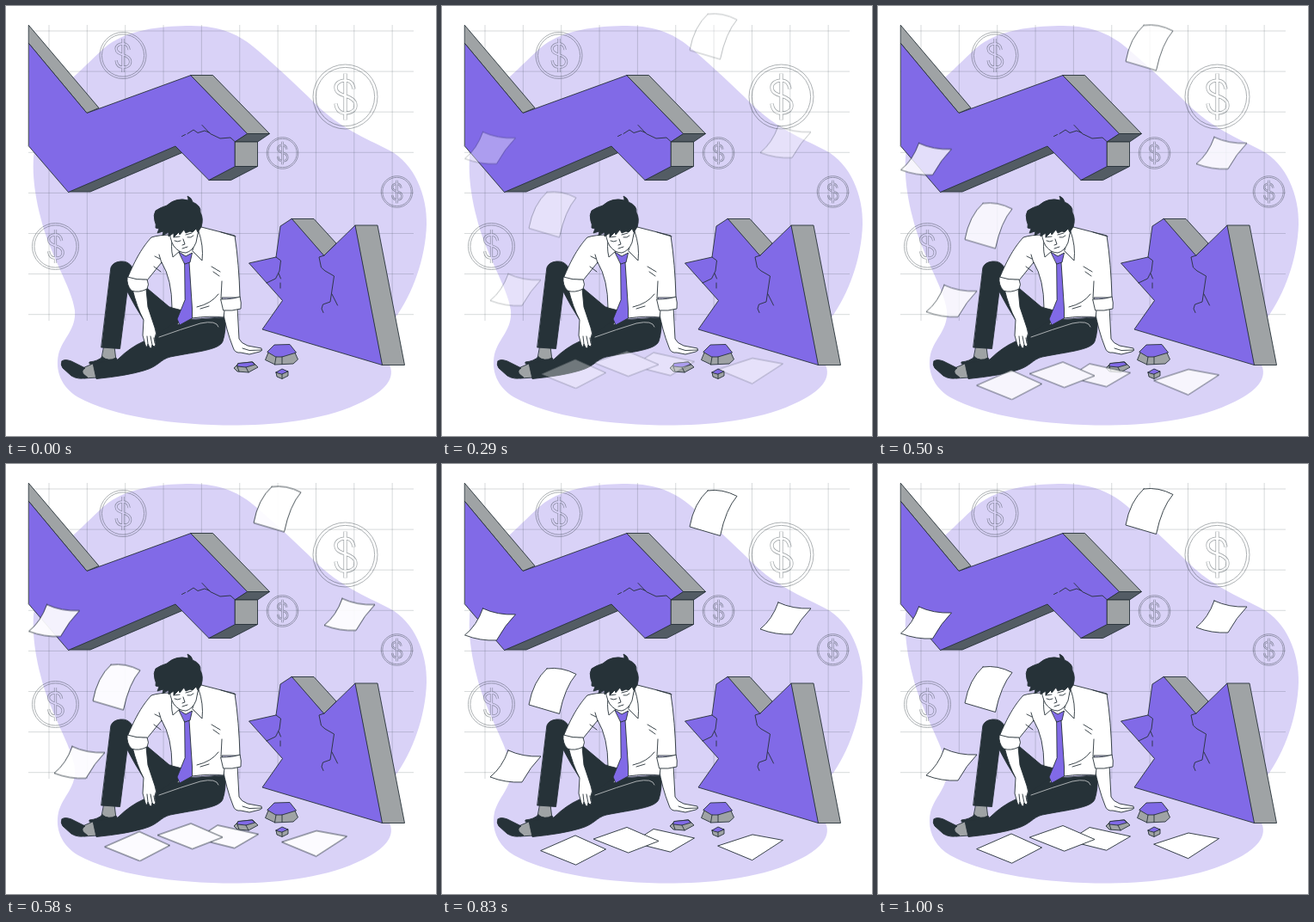
An HTML page for the animation above (1.04 s loop, 500x500 px).

```html
<!DOCTYPE html>
<html lang="en">
<head>
<meta charset="utf-8">
<title>Falling market</title>
<style>
  html, body { margin: 0; width: 100%; height: 100%; overflow: hidden; background: #fff; }
  svg { display: block; width: 100vw; height: 100vh; }
  .art { stroke: #263238; stroke-width: .9; stroke-linejoin: round; stroke-linecap: round; }
  .main { fill: #816ae7; }
  .gray { fill: #9fa3a5; }
  .deep { fill: #535c64; }
  .dark { fill: #263238; }
  .white { fill: #fff; }
  .line { fill: none; }
</style>
</head>
<body>
<svg viewBox="0 0 500 500">
  <path fill="#d9d2f7" d="M210 23C248 22 272 33 292 51C314 70 338 92 359 113C388 142 417 153 446 168C475 183 490 221 489 254C488 294 472 336 453 362C437 384 441 405 447 420C451 433 442 447 415 460C375 480 322 487 270 487.500C200 488 125 478 84 455C64 443 57 424 61 405C66 386 82 376 80 354C77 328 50 288 40 245C31 209 28 176 38 143C47 114 62 98 78 83C92 71 105 56 119 45C145 27 178 24 210 23Z"/>
  <path id="grid" fill="none" stroke="#263238" stroke-opacity=".18"/>
  <g id="coins"></g>

  <g class="art">
    <path class="gray" d="M26.500 22.500 108 118.500 94 124.500 26.500 43.500Z"/>
    <path class="deep" d="M72.500 216H98L205 170.500 197 163Z"/>
    <path class="deep" d="M236 202.500H261.500L292.500 186.500H266Z"/>
    <path class="main" d="M26.500 43.500 94 124.500 215 80.500 281 148.500 266.500 158V186.500L236 202.500 197 163 72.500 216.500 26.500 163Z"/>
    <path class="gray" d="M215 80.500H240.500L306.500 148.500H281Z"/>
    <path class="deep" d="M281 148.500H306.500L292.500 158H266.500Z"/>
    <path class="gray" d="M266.500 158H292.500V186.500H266.500Z"/>
    <path class="line" d="M228 138.500 237.500 148.500 249 154 261 153 266.500 158M237 147.500 231 145 223 147.500 218 144 211 148.500M208.500 149.500 204.500 151.500"/>
  </g>

  <g class="art">
    <path class="gray" d="M332 247.500H358L384 276 370 290Z"/>
    <path class="gray" d="M406 255H432L463.500 417.500H437.500Z"/>
    <path class="main" d="M332 247.500 319 256 314 292 282.500 299 321.500 342.500 298 376 437.500 417.500 406 255 370 290Z"/>
    <path class="line" d="M314 292 319.500 296 318 308 313.500 317 303 322M317 311 319.500 317M319 322V328M370 290 364 292 366.500 304 371 308 381.500 314 377 344 368.500 347 367 352 369 356.500M379 335 385.500 348"/>
  </g>

  <g class="art">
    <!-- raised leg -->
    <path class="gray" d="M114 396H126L128 412H111Z"/>
    <path class="dark" d="M112 408Q119 414 128 409L130 414 101 417Q96 417 97 414Q107 413 112 408Z"/>
    <path class="dark" d="M122 304Q124 298 133 297Q142 296 147 304L165 329 190 350 215 354 212 378 176 386Q159 367 141 332L132.500 398.500 111 397Z"/>
    <!-- stretched leg -->
    <path class="gray" d="M87 422 103 415 106 432 91 433Z"/>
    <path class="dark" d="M65 413Q68 410 76 413L92 421Q87 424 90 428L95 432Q84 435 76 430L66 421Q63 417 65 413Z"/>
    <path class="dark" d="M255 362Q256 378 252 390C248 400 221 402 191 408C179 411 178 419 160 424Q140 430 105 433.500L101 415Q116 414 130 411Q144 397 160 390Q180 381 198 366Z"/>
    <path fill="none" stroke="#b9bdbf" d="M178 385Q203 376 226 369Q245 365 247 373"/>

    <!-- supporting arm -->
    <path class="white" d="M252 353Q256 377 264 397Q266 404 273 403L283 405 295 402Q299 401 297 398L281 395Q273 392 271 387L269 350Z"/>
    <path class="line" d="M275 398 283 400.500 297 400"/>
    <!-- shirt -->
    <path class="white" d="M193 266Q178 266 169 269C159 280 151 293 141 317L164 319 181 298Q193 318 193 351L205 354Q203 364 199 371L216 363Q238 360 253 362L254 354 251 339 272 339Q271 300 266 267L227 257Z"/>
    <path class="white" d="M250 341Q264 341 272 338Q274 345 273 352Q263 355 253 354Z"/>
    <path class="line" d="M178 289 181 299M173 291 179 294M172 303 180 309M239 303 249 309M241 309 248 314M251 320 250 340M222 350Q239 346 247 335M226 352 236 349M250 263 267 268"/>
    <!-- hanging arm -->
    <path class="white" d="M147 329Q152 350 160 365L159 383 162 394Q164 399 165 393L167 397Q169 400 170 394L172 396Q175 396 173 386Q176 381 173 374L165 350 163 329Z"/>
    <path class="line" d="M164 384 165 393M168 384 170 394M172 386 173 392"/>
    <path class="white" d="M141 315Q152 319 164 318Q167 324 164 329Q154 334 146 331Q140 325 141 315Z"/>
    <!-- tie and collar -->
    <path class="main" d="M208 298H213L216.500 352V363L202 371 199 364 208 342Z"/>
    <path class="main" d="M201 286 209 291 216.500 287 214 298 208 300Z"/>
    <path class="white" d="M194 267Q191 280 194 292L202 285ZM224 262Q230 279 228 296L217 285Z"/>
    <!-- head -->
    <path class="white" d="M190 257Q190 271 195 279Q201 287 209 287Q217 285 221 275L225 255Z"/>
    <path class="line" d="M196 273Q200 275 203 273M211 269Q215 270 218 267M195 269 202 268M209 266 216 264M206 271 208 277 205 278M205 282 211 280"/>
    <path class="dark" d="M212 226Q212 223 211 221Q216 223 217 228Q227 232 226 240Q230 247 227 257L223 263 221 259 217 263 214 262 209 264 207 260 202 266 201 263 195 269 195 264 189 268 189 263 182 267 183 262 176 264 178 259 174 258Q175 254 173 250Q171 243 174 238Q180 234 187 232Q198 222 212 226Z"/>
  </g>

  <g class="art">
    <path class="gray" d="M305 403 301.500 411.500 313 417 334 416 339.500 411 335 401Z"/>
    <path class="main" d="M304 402 312 394 330 393.500 337.500 403 321 408 314 408Z"/>
    <path class="line" d="M314 408 312.500 417M321 408V416.500"/>
    <path class="gray" d="M270 416 265 421 269 425 282 426 293 420 287 414Z"/>
    <path class="main" d="M270 415.500 286 414 289.500 417 279 420 269 419Z"/>
    <path class="line" d="M279 420 282 426M269 419 271 425"/>
    <path class="gray" d="M314 426 315 431 321 433.500 328 430V425Z"/>
    <path class="main" d="M314 426 321 422 328 425 321 428Z"/>
    <path class="line" d="M321 428V433"/>
  </g>

  <defs>
    <path id="wide" d="M21 0Q38 8 59 7Q47 19 37 37Q18 38 0 31Q14 20 21 0Z"/>
    <path id="tall" d="M21 0.500Q38-2 55 7Q42 22 35.500 53L0 42.500Q5 15 21 .5Z"/>
  </defs>
  <g id="papers" class="art white" opacity="0">
    <use href="#tall" x="288" y="28.500"/>
    <use href="#tall" x="101" y="235.500"/>
    <use href="#wide" x="26.500" y="166"/>
    <use href="#wide" x="56" y="331"/>
    <use href="#wide" x="370" y="159"/>
    <path d="M222 438 246 422.500 293.500 433 266 449Z"/>
    <path d="M176.500 434 215 420.500 252 436.500 217 450Z"/>
    <path d="M115 447.500 155 430 190.500 446 156 464Z"/>
    <path d="M321 442 361 429 396.500 435.500 361 458.500Z"/>
  </g>
</svg>
<script>
  const $ = id => document.getElementById(id);

  const rows = Array.from({ length: 8 }, (_, i) => `M26 ${29 + 47.1 * i}H474`);
  const cols = Array.from({ length: 10 }, (_, i) => `M${50 + 44.35 * i} 22V366`);
  $('grid').setAttribute('d', rows.concat(cols).join(''));

  // The dollar sign is hollow: a wide stroke with a narrower one masked out.
  const bar = 'M0-27V27';
  const curve = 'M10-9C9-16 5-19 0-19C-7-19-11-15-11-11C-11-5-6-3 0-1C7 1 12 4 12 10C12 16 7 19 0 19C-6 19-10 16-11 8';
  function coin([x, y, r], i) {
    const k = r / 37.5;
    const stroke = (color, w) =>
      `<path d="${bar}${curve}" fill="none" stroke="${color}" stroke-width="${w}"/>`;
    return `<g transform="translate(${x} ${y})" opacity=".42">
      <g fill="none" stroke="#263238" stroke-width=".9"><circle r="${r}"/><circle r="${r * .91}"/></g>
      <mask id="coin${i}" maskUnits="userSpaceOnUse" x="-40" y="-40" width="80" height="80">
        <g transform="scale(${k})">${stroke('#fff', 3.4 + .8 / k)}${stroke('#000', 3.4 - .7 / k)}</g>
      </mask>
      <rect x="-40" y="-40" width="80" height="80" fill="#263238" mask="url(#coin${i})"/></g>`;
  }
  $('coins').innerHTML = [
    [136, 57.5, 27], [394.5, 105.5, 37.5], [321.5, 171, 18.3], [454.5, 216, 18.3], [57.5, 279.5, 27]
  ].map(coin).join('');

  // Cubic Bezier easing that overshoots before it settles.
  const cubic = (s, a, b) => 3 * (1 - s) ** 2 * s * a + 3 * (1 - s) * s * s * b + s ** 3;
  function ease(t) {
    let lo = 0, hi = 1;
    for (let i = 0; i < 30; i++) {
      const mid = (lo + hi) / 2;
      if (cubic(mid, .36, .5) < t) lo = mid; else hi = mid;
    }
    return cubic(lo, -.01, 1.38);
  }

  // Papers drop in at 24 steps per second, held between steps.
  const loop = 1040, fps = 24, hidden = 3;
  function draw() {
    const step = Math.floor((performance.now() % loop + 5) * fps / 1000);
    const p = ease(Math.min(1, (step + .5) / fps));
    const papers = $('papers');
    papers.setAttribute('opacity', step < hidden ? 0 : Math.min(1, p));
    papers.setAttribute('transform', `translate(0 ${30 * (p - 1)})`);
    requestAnimationFrame(draw);
  }
  draw();
</script>
</body>
</html>
```
